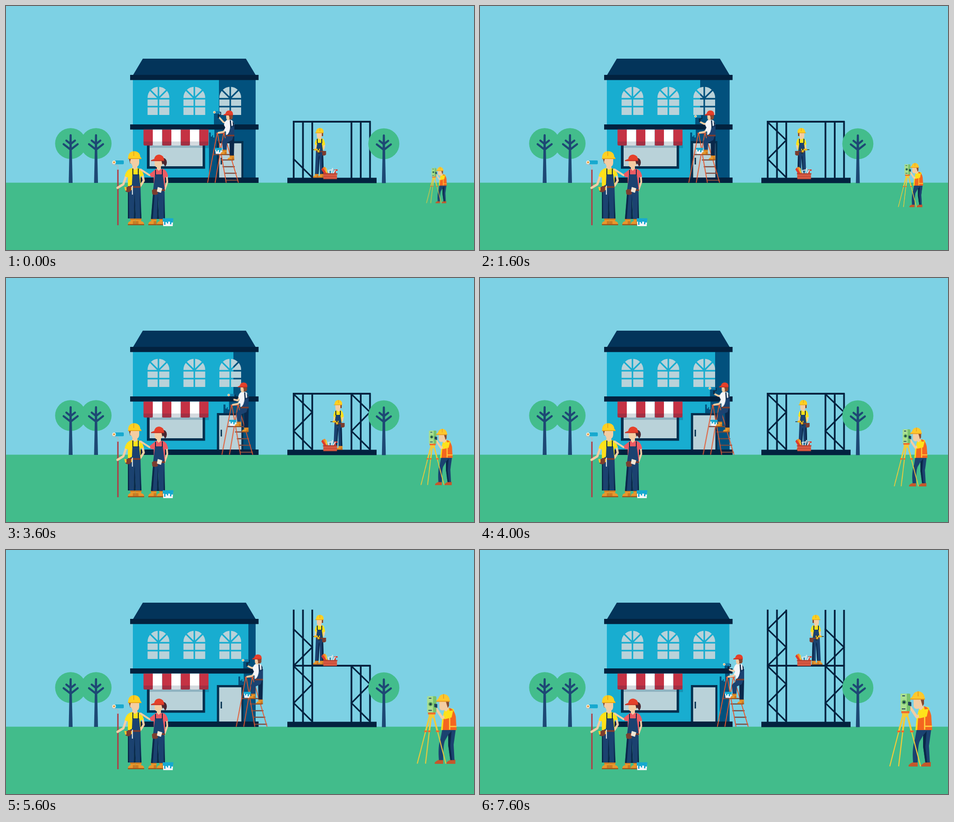
Animation, 1033 px wide and 542 px high, one loop 8000 ms. Source, as an HTML page without scripts:

```html
<!DOCTYPE html>
<html lang="en">
<head>
<meta charset="utf-8">
<title>Building site</title>
<style>
html, body { margin: 0; width: 100%; height: 100%; overflow: hidden; background: #7dd1e4; }
svg { display: block; width: 100%; height: 100%; }

.ink { fill: #02223f; }
.post { fill: none; stroke: #02223f; stroke-width: 3.8; }
.pane { fill: #b9d2d9; }
.navy { fill: #1b4270; }
.deep { fill: #0a284a; }
.skin { fill: #f3cda3; }
.limb { fill: none; stroke: #f3cda3; stroke-width: 5; stroke-linecap: round; stroke-linejoin: round; }
.thin { stroke-width: 4; }
.hair { fill: #86482f; }
.hat { fill: #fdd022; }
.cap { fill: #e5402a; }
.yellow { fill: #ffe11b; }
.belt { fill: #7c3d2f; }
.cyan { fill: #17a9cf; }
.white { fill: #f4f5f8; }

/* the painting job */
.shift { animation: shift 8s step-end infinite; }
.dry { --w: 16.2px; }
.painter { --w: 15.8px; }
.strip { transform-origin: 0 263px; animation: strip 8s step-end infinite; }
.roller { animation: roll 8s step-end infinite; }
.reach { animation: reach 8s step-end infinite; }
@keyframes shift {
  0% { transform: none; }
  20% { transform: translateX(var(--w)); }
  35% { transform: translateX(calc(var(--w) * 2)); }
  50% { transform: translateX(calc(var(--w) * 3)); }
  65% { transform: translateX(calc(var(--w) * 4)); }
  85%, 100% { transform: translateX(calc(var(--w) * 5)); }
}
@keyframes roll {
  0%, 65%, 85% { transform: none; }
  5%, 20%, 35%, 50%, 70%, 90% { transform: translateY(9px); }
  10%, 25%, 40%, 55%, 75%, 95%, 100% { transform: translateY(18px); }
  15%, 30%, 45%, 60%, 80% { transform: translateY(24px); }
}
@keyframes strip {
  0%, 65%, 85% { transform: none; }
  5%, 20%, 35%, 50%, 70%, 90% { transform: scaleY(.67); }
  10%, 25%, 40%, 55%, 75%, 95%, 100% { transform: scaleY(.33); }
  15%, 30%, 45%, 60%, 80% { transform: scaleY(.1); }
}
@keyframes reach {
  0%, 65%, 85% { d: path("M485 260L480 258L471 248"); }
  5%, 20%, 35%, 50%, 70%, 90% { d: path("M485 261L479 262L471 258"); }
  10%, 25%, 40%, 55%, 75%, 95%, 100% { d: path("M486 262L480 269L472 266"); }
  15%, 30%, 45%, 60%, 80% { d: path("M486 262L480 272L471 270"); }
}

/* the scaffold */
.brace { stroke-width: 3.3; stroke-dasharray: 3 9; stroke-dashoffset: 3.02; }
.low-l { animation: low-l 8s step-end infinite; }
.low-r { animation: low-r 8s step-end infinite; }
.top-l { animation: top-l 8s step-end infinite; }
.top-r { animation: top-r 8s step-end infinite; }
@keyframes low-l { 0% { stroke-dashoffset: 2; } 5% { stroke-dashoffset: 1; } 10%, 100% { stroke-dashoffset: 0; } }
@keyframes low-r { 25% { stroke-dashoffset: 2; } 30% { stroke-dashoffset: 1; } 35%, 100% { stroke-dashoffset: 0; } }
@keyframes top-l { 65% { stroke-dashoffset: 2; } 70% { stroke-dashoffset: 1; } 75%, 100% { stroke-dashoffset: 0; } }
@keyframes top-r { 90% { stroke-dashoffset: 2; } 95%, 100% { stroke-dashoffset: 1; } }
.posts-l { animation: posts-l 8s step-end infinite; }
.posts-r { animation: posts-r 8s step-end infinite; }
@keyframes posts-l { 0% { opacity: 0; } 60%, 100% { opacity: 1; } }
@keyframes posts-r { 0% { opacity: 0; } 85%, 100% { opacity: 1; } }
.toolbox { animation: lift 8s step-end infinite; }
@keyframes lift { 0% { transform: none; } 60%, 100% { transform: translateY(-127px); } }
.builder { animation: build 8s step-end infinite; }
@keyframes build {
  0%, 55% { transform: translate(692px, 0); }
  15% { transform: translate(690px, 0) scaleX(-1); }
  20% { transform: translate(710px, 0) scaleX(-1); }
  25% { transform: translate(738px, 0) scaleX(-1); }
  40% { transform: translate(739px, 0); }
  45% { transform: translate(733px, 0); }
  50% { transform: translate(713px, 0); }
  60% { transform: translate(692px, -127px); }
  80% { transform: translate(690px, -127px) scaleX(-1); }
  85% { transform: translate(712px, -127px) scaleX(-1); }
  90%, 100% { transform: translate(742px, -127px) scaleX(-1); }
}

/* the surveyor comes nearer */
.surveyor { transform-origin: 950px 398px; animation: near 8s infinite; }
@keyframes near {
  0% { transform: scale(.482); animation-timing-function: steps(4); }
  20% { transform: scale(.587); animation-timing-function: steps(3); }
  35% { transform: scale(.68); animation-timing-function: steps(3); }
  50% { transform: scale(.784); animation-timing-function: steps(2); }
  60% { transform: scale(.856); animation-timing-function: steps(4); }
  80%, 100% { transform: none; }
}
</style>
</head>
<body>
<svg viewBox="0 0 1033 542" preserveAspectRatio="none">
<defs>
  <clipPath id="wall"><path d="M280 164H550.5V381H280Z"/></clipPath>
  <mask id="bars" maskUnits="userSpaceOnUse" x="-30" y="170" width="60" height="80">
    <path fill="#fff" d="M-24 242V203.500A24 24 0 0 1 24 203.500V242Z"/>
    <path stroke="#000" stroke-width="3.400" fill="none" d="M0 170V245M-30 206H30M-30 223.500H30M0 205L-24 181M0 205L24 181"/>
  </mask>
  <path id="window" class="pane" mask="url(#bars)" d="M-25 178H25V243H-25Z"/>
  <g id="tree">
    <circle cy="305.500" r="34.300" fill="#43bd8c"/>
    <path fill="#1d4874" d="M-2 289L-4.300 393H4.300L2 289Z"/>
    <path fill="none" stroke="#1d4874" stroke-width="4.600" stroke-linecap="round" d="M0 287V330M-9.500 299L0 306.500L9.500 299M-15.500 307L0 319L15.500 307"/>
  </g>
  <g id="boot">
    <path fill="#e8972c" d="M5 0H16.500V13H0Q0 7 6 6Z"/>
    <path fill="#c97a22" d="M5 0H16.500V3H5ZM11 6H16.500V13H11Z"/>
    <path fill="#9a551e" d="M0 12.500H17V15H0Z"/>
  </g>
  <g id="stripe">
    <path d="M0 274.500H20.500V307Q20.500 310 17.500 310H3Q0 310 0 307Z"/>
    <path fill="#02223f" fill-opacity=".17" d="M0 301H20.500V307Q20.500 310 17.500 310H3Q0 310 0 307Z"/>
  </g>
</defs>

<path fill="#7dd1e4" d="M0 0H1033V542H0Z"/>
<path fill="#42bc8b" d="M0 392.500H1033V542H0Z"/>
<use href="#tree" x="142.700"/>
<use href="#tree" x="198.700"/>

<!-- house -->
<path fill="#03345a" d="M302 117H529.500L551.500 154H280Z"/>
<g clip-path="url(#wall)">
  <path fill="#18add0" d="M280 164H551V381H280Z"/>
  <g class="shift dry" fill="#02517d">
    <path d="M470 164H600V270H470Z"/>
    <path class="strip" d="M459 236H470.500V263H459Z"/>
    <path d="M448 281H452V290H455V287H457V292H460V272H600V381H448Z"/>
  </g>
</g>
<use href="#window" x="336.500"/>
<use href="#window" x="415.700"/>
<use href="#window" x="495"/>
<path class="ink" d="M274 153H557.500V164.500H274ZM274 263H557.500V274.500H274ZM274 381H557.500V393H274Z"/>

<path fill="#1391b3" d="M439 309H448V315.500H439Z"/>
<path fill="#03304f" d="M311 308H439.500V361.500H311Z"/>
<path class="pane" d="M317 308H434V356H317Z"/>
<path fill="#8fb3c1" d="M317 308H434V315H317Z"/>
<g fill="#c53244">
  <use href="#stripe" x="303.500"/><use href="#stripe" x="344.500"/><use href="#stripe" x="385.500"/><use href="#stripe" x="426.500"/>
</g>
<g fill="#fff">
  <use href="#stripe" x="324"/><use href="#stripe" x="365"/><use href="#stripe" x="406"/>
</g>
<path fill="#03304f" d="M465.500 300H524V381H465.500Z"/>
<path class="pane" d="M470.500 305H519.500V381H470.500Z"/>
<path fill="#03304f" d="M473.700 337H476.700V352H473.700Z"/>

<!-- scaffold -->
<path class="ink" d="M621 381.500H818V393.500H621Z"/>
<path class="post" d="M633 257H805M635 256V382M655.500 256V382M676 256V382M762.500 256V382M783 256V382M803.500 256V382"/>
<path class="post posts-l" d="M635 132.500V257M655.500 132.500V257M676 132.500V257"/>
<path class="post posts-r" d="M762.500 133V257M783 133V257M803.500 133V257"/>
<path class="post brace low-l" pathLength="3" d="M676 381L635 340L676 298L635 258"/>
<path class="post brace low-r" pathLength="3" d="M803.500 381L762.500 340L803.500 298L762.500 258"/>
<path class="post brace top-l" pathLength="3" d="M635 257L676 216L635 176L676 135"/>
<path class="post brace top-r" pathLength="3" d="M762.500 257L803.500 216L762.500 176L803.500 135"/>
<use href="#tree" x="834" y=".5"/>

<g class="builder">
  <use href="#boot" transform="translate(-14 372.500) scale(.72 .63)"/>
  <use href="#boot" transform="translate(-3 372.500) scale(.76 .63)"/>
  <path class="limb thin" d="M-8 308L-8.500 316L-4 320M10.500 309L9 317L1 320.500"/>
  <path class="yellow" d="M-4 294H6Q11 295 12.500 308L8 310V324H-7V309L-10.500 307Q-9 295 -4 294Z"/>
  <path class="navy" d="M-5 304H5L8 325L9 373H1L.5 338L-2 373H-10L-8 325Z"/>
  <path class="deep" d="M-6 295H-4V305H-6ZM4 295H6V305H4ZM8 328L9.500 373H6L5 335ZM0 332L-2 373H-4L-2 335Z"/>
  <path class="skin" d="M-3 289H4V295L1 297L-3 294Z"/>
  <path class="hair" d="M3 282H8V289H5Z"/>
  <path class="skin" d="M-6 281H5V289Q4 294 -1 294Q-6 294 -6 289Z"/>
  <path class="hat" d="M-9.500 282Q-7.500 281 -7.500 278Q-6 271 .5 271Q8.500 271 9 279V282Z"/>
  <path fill="#eaa91d" d="M-9.500 281H9V282.500H-9.500ZM0 271H1.500V278H0Z"/>
  <path class="belt" d="M-8 322H9V324.500H-8ZM6 322H14.500V330Q11 334 6 331Z"/>
  <path fill="#edb71b" d="M-12 317H1V321H-1L1 327H-3L-5 321H-12Z"/>
  <path fill="#27343e" d="M-17 318.500H-12V320H-17ZM-3 325H2V328H-3ZM-4 317H-1V320H-4Z"/>
</g>

<g class="toolbox">
  <path fill="#f08a2a" d="M699 359L704 357L711 372H704Z"/>
  <path fill="#dc3c2c" d="M696 363L699 359L707 371L703 374ZM724 363H732V366H728V373H725Z"/>
  <path fill="#f6c63a" d="M705 358L708 361L709 370H706Z"/>
  <path fill="none" stroke="#dfe7ea" stroke-width="2.200" d="M713 372L711 364M718 372L721 360M722 372L727 364M713 365L720 364"/>
  <path fill="#2d86ad" d="M714.500 366H717V373H714.500Z"/>
  <path fill="#d95a43" d="M700.500 372H730.500V384.500H700.500Z"/>
  <path fill="#b4402f" d="M699.500 371.500H731.500V374H699.500ZM700.500 378H730.500V379H700.500ZM700.500 383.500H730.500V384.500H700.500Z"/>
</g>

<!-- painter -->
<g class="shift painter">
  <path fill="none" stroke="#7a4b40" stroke-width="2.400" d="M458 330H496M474 342H502M478 357H505M482 371.500H509M485 387H513"/>
  <path fill="none" stroke="#e5582f" stroke-width="1.900" d="M466 283L445 392.500M480 284L461.500 392.500M467 283L486 392.500M481 283L513 392.500M464 282.500H484"/>
  <path class="white" d="M461 315H477L475 328.500H463Z"/>
  <path class="cyan" d="M461 315H477L476 321H473V325H470V320H467V323H464V319H461Z"/>
  <path class="deep" d="M493 288H504L503 334H494Z"/>
  <path class="navy" d="M485 289H502L499 298L488 303L487 322H479L477 302Q477 297 485 293Z"/>
  <use href="#boot" transform="translate(473.500 319.500) scale(.82 .75)"/>
  <use href="#boot" transform="translate(489 332) scale(.88 .7)"/>
  <path class="limb thin" d="M486 274L480 279.500L469 281.500"/>
  <path class="limb thin reach" d="M485 260L480 258L471 248"/>
  <path class="white" d="M488 253H497Q503 255 503.500 264V287H485.500V279L481 276L484 270L481 264Q483 255 488 253Z"/>
  <path class="navy" d="M495 268L504 264V287H487Q494 282 495 268Z"/>
  <path class="deep" d="M494 254H496.500L498 270H495ZM500 255L503 260V268H501Z"/>
  <path class="belt" d="M486 286H504V289.500H486Z"/>
  <path class="skin" d="M486 241H494V254H489Q486 252 486 247Z"/>
  <path class="hair" d="M491 241H500.500V248Q500 253 493 252V247Z"/>
  <path class="cap" d="M480 242.500Q481 240 484.500 239Q486 232 492.500 232Q500 232 501 239V242.500Z"/>
  <path fill="#c32f22" d="M480 241.500H501V243H480Z"/>
  <g class="roller">
    <path fill="none" stroke="#10233b" stroke-width="1.700" d="M472 236H474V241L469 243V249"/>
    <path fill="#10233b" d="M467.500 241H470.500V249H467.500Z"/>
    <path fill="#117fae" d="M460 233.500H472.500V239H460Z"/>
    <circle cx="460" cy="236" r="2.700" fill="#f6ead2"/>
    <circle cx="460" cy="236" r="1.300" fill="#e39330"/>
  </g>
</g>

<!-- the pair in front -->
<g>
  <path fill="#b33a44" d="M245.500 363H248.500V487H245.500Z"/>
  <path fill="none" stroke="#a9b9c4" stroke-width="1.700" d="M247 364V355L235 351V347H241"/>
  <rect class="cyan" x="240" y="343" width="20" height="8.500" rx="2"/>
  <circle cx="238.500" cy="347.300" r="4" fill="#f6ead2"/>
  <circle cx="238.500" cy="347.300" r="2" fill="#e39330"/>
  <use href="#boot" transform="translate(269 472)"/>
  <use href="#boot" transform="matrix(-1.150 0 0 1 305 472)"/>
  <path class="limb" d="M265 378L259 396L246 404M301 374L304 388L297 399"/>
  <path class="yellow" d="M278 360H291Q301 362 304 376L297 379V401H269V381L262 378Q266 362 278 360Z"/>
  <path class="navy" d="M279 374H294L297 404L299 472H286.500L284 424L282 472H269L269 402L278 397Z"/>
  <path class="deep" d="M279 361H281V376H279ZM291 361H293V376H291ZM269 406H271L272 472H269ZM284 414L286.500 472H282L283 430ZM295 412L299 472H296Z"/>
  <path class="skin" d="M279 352H290V360L285 364L279 360Z"/>
  <path class="hair" d="M271 338H278V350H274Z"/>
  <path class="skin" d="M276 338H294V349Q293 357.500 286 357.500Q278 357 277 350Q273 350 274 345Z"/>
  <path class="hat" d="M269.500 339Q269 323 283 322.500Q295 323 296.500 335L299 338V339.500Z"/>
  <path fill="#eaa91d" d="M269.500 338H299V340H269.500ZM281 323H283V333H281Z"/>
  <path class="belt" d="M269 400H297V404H269ZM263 402H276V411Q270 416 264 412Z"/>
  <path fill="#f2c230" d="M261 402H266V410H263ZM276 402H278V409H276Z"/>
  <path fill="none" stroke="#d8e0e4" stroke-width="2.200" d="M279 399V419"/>
</g>
<g>
  <use href="#boot" transform="translate(314 472) scale(1.100 1)"/>
  <use href="#boot" transform="translate(333 472) scale(1.050 1)"/>
  <path fill="#4b2730" d="M343 337Q354 336 355 347Q355 353 351 357Q349 351 345 348Z"/>
  <path class="limb thin" d="M327 371L317 376L297 363M355 379L356 391L349 411"/>
  <path fill="#ed5b63" d="M331 362H346Q355 364 358 379L351 381V406H326V380L320 380L317 373Z"/>
  <path class="navy" d="M329 374H346L350 406L351 473H338L336 430L333 473H320L325 406Z"/>
  <path class="deep" d="M329 364H331V376H329ZM344 363H346V376H344ZM335 418L338 473H333ZM348 418L351 473H348ZM325 415L328 420L324 473H320Z"/>
  <path class="skin" d="M333 354H342V362L337 366L333 362Z"/>
  <path class="skin" d="M328 343H346V351Q342 359 336 359Q328 358 328 351Z"/>
  <path fill="#4b2730" d="M343 343H349V349L345 352Z"/>
  <path class="cap" d="M320 343.500Q322 341 327 340Q329 330 338 330Q348 331 349 342V343.500Z"/>
  <path fill="#c32f22" d="M320 342.500H349V344.500H320Z"/>
  <path class="belt" d="M324 407H351V411H324ZM322 409H335V418Q328 421 323 418Z"/>
  <path fill="#f1e7d6" d="M335 402L345 405L342 415L333 412Z"/>
  <path class="white" d="M346 472H369L368 489H347Z"/>
  <path class="cyan" d="M346 471.500H369.500L368.500 481H365V485H362V479H358V483H355V480H352V486H349V479H346Z"/>
</g>

<g class="surveyor">
  <path fill="#c4582c" d="M946 481V478Q950 473 957 471H966V481ZM974 481V478Q978 473 985 471H995V481Z"/>
  <path class="navy" d="M964 398H996L991 435L993 472H983L978 436V412L970 426Q966 437 966 472H956Q953 440 960 420Z"/>
  <path class="deep" d="M978 412L986 402L983 437L987 472H983L978 436Z"/>
  <path fill="none" stroke="#f4cb38" stroke-width="2.300" d="M935 362L904.500 480.500M938 362L924 480.500M942 362L972.500 480.500"/>
  <path fill="none" stroke="#f4cb38" stroke-width="4" d="M934.500 364L924.500 403M938 364L933 403M942.500 364L952.500 403"/>
  <path fill="#ef6a2c" d="M921 401H928V405H921ZM930 401H936V405H930ZM949 401H957V405H949Z"/>
  <path fill="#f4cb38" d="M931 362H947L944 371H933Z"/>
  <path fill="#ef6a2c" d="M930 358H948V362.500H930Z"/>
  <path class="yellow" d="M970 350Q984 346 991 350L996 372L982 376L966 400H961L964 371Z"/>
  <path fill="#f4661f" d="M980 347Q992 349 996 368L998 400H965L967 374L978 372L983 362Z"/>
  <path fill="#ffc93b" d="M980 371H983V399H980ZM983 390H998V393H983Z"/>
  <path class="skin" d="M966 343H979V350L973 356L966 350Z"/>
  <path class="skin" d="M957 331H976V344Q972 353 964 353Q957 352 957 345Z"/>
  <path class="hair" d="M972 330H980V342L977 347Z"/>
  <path class="hat" style="fill:#fdc82d" d="M949 330Q953 327 955 324Q958 314 968 314Q980 315 982 330V332H951Z"/>
  <path fill="#eaa024" d="M950 330H982V332.500H950ZM966 314H968V325H966Z"/>
  <path class="limb" style="stroke-width:6" d="M976 363L964 371L950 350"/>
  <path class="yellow" d="M974 355L990 353L986 370L970 374L968 365Z"/>
  <rect x="928" y="319" width="22" height="39" rx="3" fill="#79c36c"/>
  <path fill="#a9df90" d="M928 322Q928 319 931 319H942V358H931Q928 358 928 355Z"/>
  <circle cx="936" cy="338" r="5" fill="#5ea95f"/>
  <circle cx="936" cy="338" r="2.600" fill="#18384a"/>
  <path fill="#20405a" d="M945 337L952 338V347L945 345ZM932 323H938V325H932ZM931 352H939V354H931Z"/>
</g>
</svg>
</body>
</html>
```
